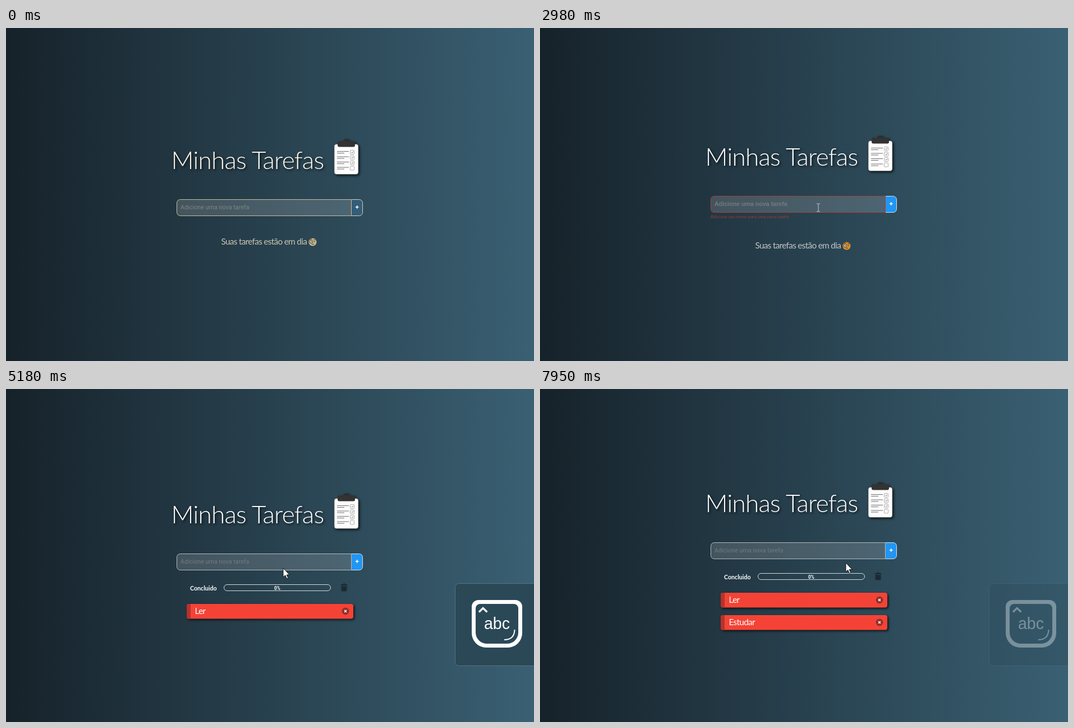
Write an HTML page that moves like this. It is 941 px wide and 595 px high and loops after 8 s.

```html
<!DOCTYPE html>
<html lang="pt-BR">
<head>
<meta charset="utf-8">
<title>Minhas Tarefas</title>
<style>
html, body { margin: 0; width: 100%; height: 100%; overflow: hidden; }
body { background: linear-gradient(to right, #16222a, #3a6073); }
svg { display: block; width: 941px; height: 595px; }
text { white-space: pre; }

svg { --line: #b4bcc0; --title: #fff; --hint: #757a7d; --soft: #c3c6c7; --face: #dba83a; }
svg.error { --line: #a8403b; --face: #dc8f2c; }
svg.warm { --line: #cbbd9a; --title: #fff9ec; --hint: #82857d; --soft: #cbc5ae; --face: #c3b68e; }

.lato { font: 400 15.36px Lato, sans-serif; letter-spacing: -.7px; }
.title { font-size: 44.2px; font-weight: 300; letter-spacing: -.8px; fill: var(--title); }
.shadow { filter: drop-shadow(2px 2px 2px rgba(0, 0, 0, .75)); }
.soft { fill: var(--soft); }
.field { fill: rgba(255, 255, 255, .15); stroke: var(--line); }
.typed { font: 700 10.67px Roboto, sans-serif; fill: #fff; }
.hint { font: 400 10.67px Roboto, sans-serif; letter-spacing: .07px; fill: var(--hint); }
.error .hint { font: 700 10.67px "Liberation Sans", Arial, sans-serif; letter-spacing: 0; }
.warn { font: 300 8px Lato, sans-serif; fill: #e2402f; }
.popup text { font: 12.8px "Open Sans", sans-serif; fill: #fff; }
.bold { font: 700 10.67px Lato, sans-serif; fill: #fff; }
.percent { font: 700 8.4px Roboto, sans-serif; fill: #fff; }
.abc { font: 28.6px "Liberation Sans", Arial, sans-serif; fill: #fff; }
.mid { text-anchor: middle; }
</style>
</head>
<body>
<svg id="stage" viewBox="0 0 941 595">
  <defs>
    <g id="row">
      <path d="M590 220.5h21M590 223.5h13" stroke="#6c6c6c" />
      <rect x="613.5" y="218.5" width="7" height="7" rx="1" fill="none" stroke="#999" stroke-width=".8" />
    </g>
    <path id="tick" d="M615.5 222l1.300 1.300 2.200-2.800" fill="none" stroke="#555" stroke-width=".8" />
    <g id="card">
      <rect class="shadow" x="322" y="396" width="297" height="26.5" rx="4" fill="#f44336" />
      <path d="M329 396h-3a4 4 0 0 0-4 4v18.500a4 4 0 0 0 4 4h3z" fill="#b7322b" />
      <circle cx="605" cy="409" r="6.500" fill="#92302b" />
      <path d="M603 407l4 4m0-4l-4 4" stroke="#fff" stroke-width="1.500" />
    </g>
  </defs>

  <g id="page">
    <g class="shadow">
      <text class="lato title" x="294.5" y="252">Minhas Tarefas</text>
    </g>
    <g class="shadow">
      <rect x="585" y="207.500" width="43" height="54" rx="4" fill="#fdfdfd" stroke="#4a4d4f" stroke-width=".7" />
      <rect x="601" y="198.500" width="11" height="8" rx="4" fill="#2b2d2f" />
      <rect x="591" y="202" width="31" height="10.500" rx="3" fill="#333" />
    </g>
    <use href="#row" /><use href="#row" y="9.500" /><use href="#row" y="19" /><use href="#row" y="28.500" />
    <use href="#tick" /><use href="#tick" y="9.500" /><use href="#tick" y="19" />

    <path class="field" d="M615.500 306.500h-305a6 6 0 0 0-6 6v17a6 6 0 0 0 6 6h305z" />
    <path id="button" d="M616 306.500h13.500a6 6 0 0 1 6 6v17a6 6 0 0 1-6 6h-13.500" />
    <path d="M622.800 320h5.800m-2.900-2.900v5.800" stroke="#fff" stroke-width="1.400" />
    <text id="hint" class="hint" x="311" y="323.500">Adicione uma nova tarefa</text>
    <text id="typed" class="typed" x="311" y="323.500"></text>
    <rect id="caret" y="313.500" width="1" height="12.500" fill="#fff" />
    <text id="warn" class="warn" x="304" y="346">Adicione um nome para uma nova tarefa</text>

    <g id="idle">
      <text class="lato soft" x="383.5" y="387">Suas tarefas estão em dia</text>
      <g fill="none" stroke="#4a3a22">
        <circle cx="546.500" cy="382.500" r="7" fill="var(--face)" stroke="none" />
        <circle cx="544" cy="382" r="2.800" fill="#e9e4d4" />
        <circle cx="544.300" cy="382" r=".7" />
        <circle cx="549.800" cy="381.500" r=".6" />
        <path d="M541.500 378q2-1.500 4-.5M548 378.500q2-1 3.500.5M545 387q2-1.500 4-.5" />
      </g>
    </g>

    <g id="list">
      <text class="bold" x="328" y="372">Concluido</text>
      <rect x="388.500" y="361.500" width="190" height="11" rx="5.500" fill="none" stroke="#d3dade" />
      <text class="percent mid" x="483.500" y="371">0%</text>
      <path d="M596.500 361h3.500l1-1.500h3l1 1.500h3.500v2h-12zM597.500 364h10v8q0 1.500-1.500 1.500h-7q-1.500 0-1.500-1.500z" fill="#1c2a33" />
      <g id="first">
        <use href="#card" />
        <text class="lato" x="336.500" y="414" fill="#fff">Ler</text>
      </g>
      <g id="second">
        <use href="#card" y="40" />
        <text class="lato" x="336.500" y="454" fill="#fff">Estudar</text>
      </g>
    </g>
  </g>

  <g id="popup" class="popup">
    <rect class="shadow" x="317" y="279" width="155.500" height="34.500" rx="7" fill="#2b2c2c" />
    <text x="334.500" y="301">Lá</text>
    <text x="373.500" y="301">Logo</text>
    <text x="429" y="301">Legal</text>
  </g>

  <g id="panel">
    <rect x="800.500" y="347.500" width="150" height="147" rx="7" fill="#2b4857" stroke="#587380" />
    <path fill="#fff" fill-rule="evenodd" d="M842 377h66a12 12 0 0 1 12 12v47a26 26 0 0 1-26 26h-38a26 26 0 0 1-26-26v-47a12 12 0 0 1 12-12z
      M845 384a8 8 0 0 0-8 8v43a20 20 0 0 0 20 20h36a20 20 0 0 0 20-20v-43a8 8 0 0 0-8-8z" />
    <path d="M843 398.500l7.200-7 7.200 7" fill="none" stroke="#fff" stroke-width="3.200" />
    <path d="M888 448q18 0 18.500-18" fill="none" stroke="#fff" stroke-width="2" />
    <text class="abc mid" x="875" y="429">abc</text>
  </g>

  <g id="pointer">
    <path id="arrow" d="M0 0v16.300l3.700-3.500 2.600 6 2.500-1.100-2.600-5.700h5z" fill="#fff" stroke="#111" />
    <path id="hand" d="M-2 2q0-2 2-2t2 2v6q2-1.500 3.200.5 2-1 3 1 1.800-.5 1.800 1.500v4l-2 4v3h-9v-3l-5-6q-.5-2.500 2-2l2 2z" fill="#fff" stroke="#111" />
    <path id="beam" d="M-3-7h2.500l.5.500.5-.5h2.500M0-6.500v13M-3 7h2.500l.5-.5.5.5h2.500" fill="none" stroke="#c9ccce" />
  </g>
</svg>

<script>
const LOOP = 8000;
const ids = ['stage', 'page', 'button', 'hint', 'typed', 'caret', 'warn', 'idle', 'list',
  'first', 'second', 'popup', 'panel', 'pointer', 'arrow', 'hand', 'beam'];
const ui = Object.fromEntries(ids.map(id => [id, document.getElementById(id)]));

// [time, value] pairs: the last value whose time has come
const at = (steps, t) => steps.reduce((v, [time, next]) => t >= time ? next : v, steps[0][1]);
const ramp = (t, a, b) => Math.min(1, Math.max(0, (t - a) / (b - a)));
const show = (el, on) => el.setAttribute('visibility', on ? 'visible' : 'hidden');

const shift = [[0, 0], [1420, -6], [3040, 0], [4630, -12], [6970, -32]];
const words = [[0, ''], [3990, 'L'], [4520, 'Ler'], [4630, ''], [6640, 'Estudar '], [6970, '']];
const shape = [[0, 'arrow'], [680, 'hand'], [2280, 'arrow'], [2760, 'beam'], [4630, 'arrow']];
const fills = [[0, '#345d78'], [820, '#0b7ad4'], [2280, '#2196f3']];
const carets = [[0, 0], [3040, 1], [3590, 0], [3990, 1], [5180, 0], [5710, 1], [6240, 0], [6640, 1], [7500, 0]];

const path = [
  [70, 866, 552], [275, 760, 440], [545, 638, 335], [700, 630, 325], [820, 627, 323],
  [2210, 627, 323], [2350, 606, 343], [2560, 568, 353], [2770, 524, 343], [2980, 496, 321],
  [4629, 496, 321], [4630, 494, 320], [7320, 494, 320], [7740, 546, 311], [7950, 545, 310.5]
];

// the pointer is sampled at a fixed beat while it travels
function pointerAt(t) {
  const start = at([[0, 70], [2210, 2210], [4630, 4630], [6970, 6970]], t);
  const beat = t < 2210 ? 68.1 : 70;
  const time = start + Math.floor((t - start) / beat) * beat;
  const i = path.findIndex(p => p[0] > time);
  if (i === 0) return path[0].slice(1);
  if (i < 0) return path[path.length - 1].slice(1);
  const [a, x, y] = path[i - 1], [b, x2, y2] = path[i];
  const k = ramp(time, a, b);
  return [x + (x2 - x) * k, y + (y2 - y) * k];
}

function render(t) {
  const word = at(words, t);
  const failed = t >= 1420 && t < 3040;
  ui.stage.setAttribute('class', t < 1420 ? 'warm' : failed ? 'error' : '');
  ui.page.setAttribute('transform', `translate(0 ${at(shift, t)})`);
  ui.button.setAttribute('fill', at(fills, t));
  ui.button.setAttribute('stroke', t < 820 ? '#d8d3bd' : '#d5e3ee');

  if (ui.typed.textContent !== word) ui.typed.textContent = word;
  show(ui.hint, !word);
  show(ui.caret, at(carets, t));
  ui.caret.setAttribute('x', 311 + (word ? ui.typed.getComputedTextLength() : 0));

  show(ui.warn, failed);
  ui.warn.setAttribute('opacity', ramp(t, 1340, 1680));
  show(ui.idle, t < 4630);
  ui.idle.setAttribute('transform', `translate(0 ${failed ? 13 : 0})`);
  show(ui.list, t >= 4630);
  ui.first.setAttribute('opacity', ramp(t, 4560, 4850));
  ui.second.setAttribute('opacity', ramp(t, 6900, 7180));

  show(ui.popup, t >= 4100 && t < 4630);
  ui.panel.setAttribute('opacity', ramp(t, 3990, 4310) * (1 - ramp(t, 7670, 8090)));

  const [x, y] = pointerAt(t);
  const now = at(shape, t);
  ui.pointer.setAttribute('transform', `translate(${x.toFixed(1)} ${y.toFixed(1)})`);
  for (const id of ['arrow', 'hand', 'beam']) show(ui[id], t >= 70 && id === now);
}

const begin = performance.now();
function tick() {
  render((performance.now() - begin) % LOOP);
  requestAnimationFrame(tick);
}
tick();
</script>
</body>
</html>
```
